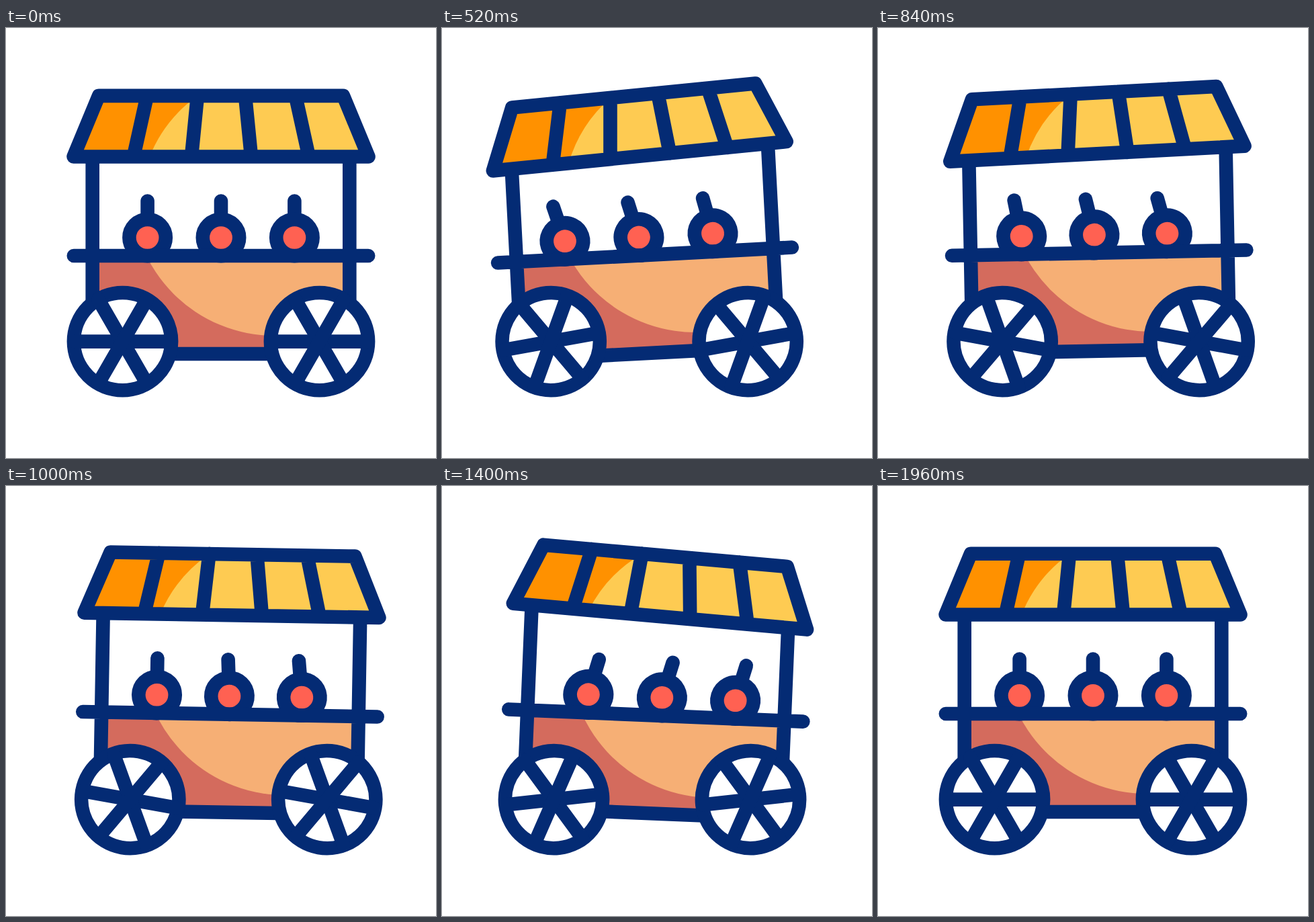
An HTML page for the animation above (2000 ms loop, 640 px wide and 640 px high).

```html
<!DOCTYPE html>
<html lang="en">
<head>
<meta charset="utf-8">
<title>Street food cart</title>
<style>
  html, body { margin: 0; width: 100%; height: 100%; overflow: hidden; background: #fff; }
  svg { display: block; width: 100%; height: 100%; }
  .line { fill: none; stroke: #042b74; stroke-width: 20.6; stroke-linecap: round; stroke-linejoin: round; }
</style>
</head>
<body>
<svg viewBox="0 0 640 640">
  <defs>
    <clipPath id="panel"><path d="M128.7 339H511.3V485H128.7Z"/></clipPath>
    <clipPath id="awning"><path d="M138 100.8H502L539.5 191.5H100.5Z"/></clipPath>
    <g id="fruit">
      <path class="line" d="M0-54.5V-27"/>
      <circle class="line" r="27.2" style="fill:#ff6152"/>
    </g>
    <g id="wheel">
      <circle class="line" r="72.6" style="fill:#fff"/>
      <path id="spoke" class="line" d="M-72 0H72"/>
      <use href="#spoke" transform="rotate(60)"/>
      <use href="#spoke" transform="rotate(120)"/>
    </g>
  </defs>
  <g id="body">
    <g clip-path="url(#panel)">
      <path fill="#d46b5d" d="M128 339H512V486H128Z"/>
      <circle fill="#f6af75" cx="400" cy="245" r="213"/>
    </g>
    <use class="fruit" href="#fruit"/>
    <use class="fruit" href="#fruit"/>
    <use class="fruit" href="#fruit"/>
    <path class="line" d="M128.7 191.5V485H511.3V191.5M100.8 339H539.2"/>
    <g id="roof">
      <g clip-path="url(#awning)">
        <path fill="#ff9100" d="M90 90H550V200H90Z"/>
        <path fill="#fecb52" d="M285 101A205 205 0 0 0 213.5 192H550V101Z"/>
      </g>
      <path class="line" d="M138 100.8H502L539.5 191.5H100.5ZM210 100.8 189.8 191.5M285 100.8 276 191.5M356 100.8 365 191.5M430.8 100.8 450.8 191.5"/>
    </g>
  </g>
  <use class="wheel" href="#wheel"/>
  <use class="wheel" href="#wheel"/>
</svg>
<script>
const $ = s => document.querySelector(s), all = s => document.querySelectorAll(s);
const body = $('#body'), roof = $('#roof'), fruits = all('.fruit'), wheels = all('.wheel');
const LOOP = 2000;

// [time, value] keys, smoothly eased between each pair
const drive = [[0, 0], [445, -13], [910, 13], [1390, -7], [1800, 0]];
const lean = [[0, 0], [565, -3.05], [1265, 2.8], [1800, 0]];
const sway = [[80, 0], [645, -3], [1345, 2.8], [1840, 0]];
const roll = [[80, 0], [625, -17.3], [1345, 15], [1854, 0]];

function at(keys, t) {
  const i = keys.findIndex(k => k[0] > t);
  if (i < 0) return keys[keys.length - 1][1];
  if (i === 0) return keys[0][1];
  const [t0, a] = keys[i - 1], [t1, b] = keys[i];
  return a + (b - a) * (1 - Math.cos(Math.PI * (t - t0) / (t1 - t0))) / 2;
}

const move = (el, value) => el.setAttribute('transform', value);

function draw(t) {
  const x = at(drive, t);
  const bounce = t < 1960 ? 5.6 * Math.sin(4 * Math.PI * t / 1960) : 0;
  move(body, `translate(${x} ${bounce}) rotate(${at(lean, t)} 320 466.5)`);
  move(roof, `rotate(${at(sway, t)} 320 191.5)`);
  fruits.forEach((el, i) => {
    const angle = at(roll, t - 40 * i);
    move(el, `translate(${210.6 + 109.4 * i + 0.53 * angle} 312) rotate(${angle})`);
  });
  wheels.forEach((el, i) =>
    move(el, `translate(${173.5 + 293 * i + x} 466.6) rotate(${0.9 * x})`));
}

const start = performance.now();
function tick() {
  draw((performance.now() - start) % LOOP);
  requestAnimationFrame(tick);
}
tick();
</script>
</body>
</html>
```
